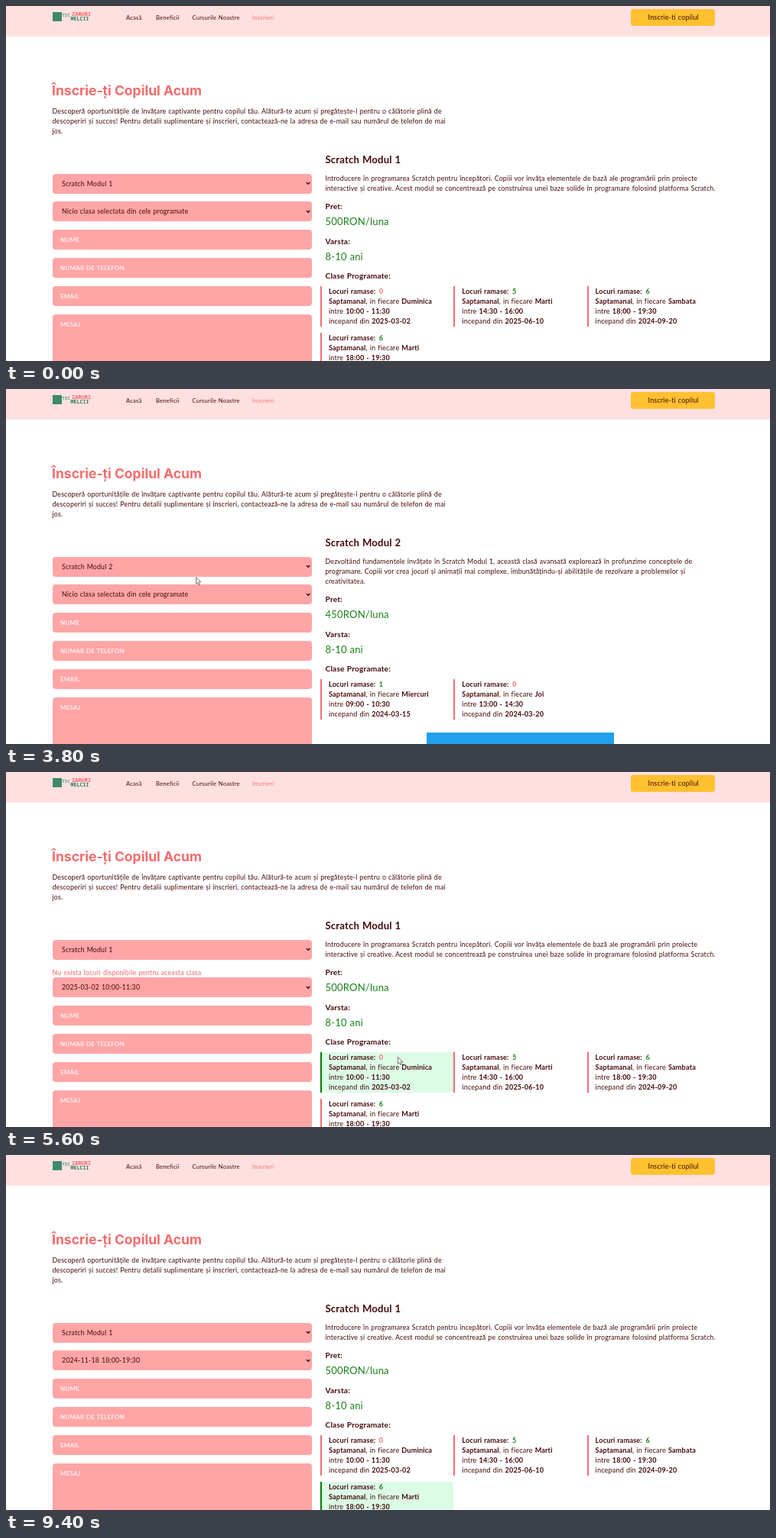
Animation of 999x465 px, one loop 9.5 s. Source, as an HTML page:

```html
<!DOCTYPE html>
<html lang="ro">
<head>
<meta charset="utf-8">
<title>Inscrieri</title>
<style>
  html, body { margin: 0; width: 100%; height: 100%; overflow: hidden; background: #fff; }
  #stage {
    position: absolute; left: 0; top: 0; width: 999px; height: 465px; overflow: hidden;
    color: #450a0a; font: 9px Lato, "Open Sans", sans-serif;
    letter-spacing: .018em; word-spacing: .055em;
  }
  #stage div, #stage svg { position: absolute; }
  .t { white-space: nowrap; line-height: 20px; }
  .t b { font-weight: 700; }
  #panel, #form { left: 0; top: 0; width: 999px; height: 465px; }
  .field { left: 60.5px; width: 339.5px; height: 26px; border-radius: 4px; background: #ffa5a5; }
  .focus { box-shadow: 0 0 0 1.3px #140505 inset, 0 0 0 .4px #140505; }
  .card { width: 172.4px; height: 53px; border-left: 2px solid #f56e6e; }
  .card.on { background: #dcfce7; border-color: #008000; }
  .mono { font-family: "Noto Sans Mono", "DejaVu Sans Mono", monospace; font-weight: 700; letter-spacing: 0; }
  .title { font-family: Inter, sans-serif; font-weight: 700; letter-spacing: 0; word-spacing: 0; }
</style>
</head>
<body>
<div id="stage"></div>
<script>
const LOOP = 9500, STEP = 100;
const RED = '#f56e6e', GREEN = '#1a821a', BODY = 8.83;
const stage = document.getElementById('stage');

function add(parent, cls, css, html = '') {
  const el = document.createElement('div');
  el.className = cls;
  el.style.cssText = css;
  el.innerHTML = html;
  parent.append(el);
  return el;
}
const box = (parent, x, y, w, h, css) =>
  add(parent, '', `left:${x}px;top:${y}px;width:${w}px;height:${h}px;${css}`);
// Text placed by its left edge and vertical centre.
const text = (parent, x, y, size, html, css = '', cls = '') =>
  add(parent, 't ' + cls, `left:${x}px;top:${y - 10}px;font-size:${size}px;${css}`, html);

// Header
box(stage, 0, 0, 999, 40, 'background:#ffe0e0');
box(stage, 61, 8, 12, 12, 'background:#3f8a6c');
text(stage, 73.5, 11.5, 5.6, 'TIC', 'color:#3f9a78', 'mono');
text(stage, 86, 11.2, 7, 'ZARURI', 'color:#ee6468', 'mono');
text(stage, 84.5, 17.3, 6.7, 'MELCII', 'color:#2f7d62', 'mono');
[[157, 'Acasă'], [196, 'Beneficii'], [243.5, 'Cursurile Noastre'], [322, 'Inscrieri', RED]]
  .forEach(([x, label, color = '#450a0a']) => text(stage, x, 15, 7.7, label, `color:${color}`));
box(stage, 817.4, 3.8, 109.9, 22.2, 'background:#ffc12f;border-radius:3px');
text(stage, 839.5, 14.8, 9.05, 'Inscrie-ti copilul');

// Intro
text(stage, 60, 110.5, 17.55, 'Înscrie-ți Copilul Acum', 'color:#f26c6c', 'title');
['Descoperă oportunitățile de învățare captivante pentru copilul tău. Alătură-te acum și pregătește-l pentru o călătorie plină de',
 'descoperiri și succes! Pentru detalii suplimentare și înscrieri, contactează-ne la adresa de e-mail sau numărul de telefon de mai',
 'jos.'].forEach((line, i) => text(stage, 60.5, 138 + i * 13, BODY, line));

// Course panel
const modules = [
  {
    name: 'Scratch Modul 1', price: '500RON/luna',
    about: [
      'Introducere în programarea Scratch pentru începători. Copiii vor învăța elementele de bază ale programării prin proiecte',
      'interactive și creative. Acest modul se concentrează pe construirea unei baze solide în programare folosind platforma Scratch.'],
    classes: [
      [0, 'Duminica', '10:00 - 11:30', '2025-03-02'],
      [5, 'Marti', '14:30 - 16:00', '2025-06-10'],
      [6, 'Sambata', '18:00 - 19:30', '2024-09-20'],
      [6, 'Marti', '18:00 - 19:30', '2024-11-18']]
  },
  {
    name: 'Scratch Modul 2', price: '450RON/luna',
    about: [
      'Dezvoltând fundamentele învățate în Scratch Modul 1, această clasă avansată explorează în profunzime conceptele de',
      'programare. Copiii vor crea jocuri și animații mai complexe, îmbunătățindu-și abilitățile de rezolvare a problemelor și',
      'creativitatea.'],
    classes: [
      [1, 'Miercuri', '09:00 - 10:30', '2024-03-15'],
      [0, 'Joi', '13:00 - 14:30', '2024-03-20']]
  }
];
const panel = add(stage, '', '');
panel.id = 'panel';

function addCard(parent, [seats, day, hours, date], i, top) {
  const x = 411 + (i % 3) * 174.3, y = top + Math.floor(i / 3) * 61.3;
  const card = add(parent, 'card', `left:${x}px;top:${y}px`);
  [`<b>Locuri ramase:</b><b style="margin-left:4.5px;color:${seats ? GREEN : RED}">${seats}</b>`,
   `<b>Saptamanal</b>, in fiecare <b>${day}</b>`,
   `intre <b>${hours}</b>`,
   `incepand din <b>${date}</b>`].forEach((row, k) => text(card, 9, 7 + k * 13.05, 9.1, row));
  return card;
}

const views = modules.map(m => {
  const el = add(panel, '', 'left:0;top:0');
  const x = 417.5, dy = (m.about.length - 2) * 13;
  text(el, x, 201, 13.15, m.name, 'font-weight:700');
  m.about.forEach((line, i) => text(el, x, 225.5 + i * 13, BODY, line));
  [[261.5, 'Pret:'], [307.5, 'Varsta:'], [353, 'Clase Programate:']]
    .forEach(([y, label]) => text(el, x, y + dy, 10.2, label, 'font-weight:700'));
  text(el, x, 282 + dy, 13.1, m.price, `color:${GREEN}`);
  text(el, x, 328 + dy, 13, '8-10 ani', `color:${GREEN}`);
  const cards = m.classes.map((c, i) => addCard(el, c, i, 367 + dy));
  return { el, cards };
});
box(views[1].el, 550, 450, 245, 20, 'background:#21a0eb');

// Form
function addSelect(parent, y) {
  const field = add(parent, 'field', `top:${y}px`);
  const label = text(field, 12.5, 13, 8.8, '');
  add(field, '', 'left:331px;top:10.5px;width:7px;height:5px',
    '<svg width="7" height="5" style="left:0;top:0"><path d="M1 1L3.2 3.4 5.4 1" fill="none" stroke="#1c0505" stroke-width="1.3"/></svg>');
  return { field, label };
}
const course = addSelect(stage, 219.7);
const error = text(stage, 60.5, 263, 8.8, 'Nu exista locuri disponibile pentru aceasta clasa', 'color:#ee6666');
const form = add(stage, '', '');
form.id = 'form';
const slot = addSelect(form, 256.4);
['NUME', 'NUMAR DE TELEFON', 'EMAIL', 'MESAJ'].forEach((label, i) => {
  const field = add(form, 'field', `top:${293.3 + i * 37}px;` + (i === 3 ? 'height:90px' : ''));
  text(field, 10.5, 13, 8.1, label, 'color:#fff;font-weight:500');
});

// Pointer
const pointer = add(stage, '', 'left:0;top:0;width:9px;height:12px',
  '<svg width="9" height="12" style="left:0;top:0"><path d="M.6.6V9.2L2.6 7.4 4 10.7 5.5 10 4.1 6.9H6.9Z" fill="#fff" stroke="#555" stroke-width=".8"/></svg>');

// Pointer runs of [time, x, y]; it is hidden between runs.
const runs = [
  [[400, 413, 198], [800, 350, 228], [1300, 295, 244], [1500, 295, 244], [1700, 287, 238],
   [2200, 287, 238], [2600, 258, 239], [2900, 252, 238.5], [3200, 250, 242], [3700, 248, 246],
   [4200, 248, 246], [4300, 250, 239], [4500, 250, 239], [4600, 262, 246], [4900, 414, 300.5],
   [5500, 512, 373], [5900, 512, 373], [6300, 568, 381]],
  [[6900, 352, 294], [7200, 248, 262], [7400, 248, 262], [7600, 241, 284], [8200, 241, 284],
   [8500, 515, 454], [8600, 515, 454], [8900, 515, 466]]
];

function pointerAt(t) {
  const run = runs.find(r => t >= r[0][0] && t <= r[r.length - 1][0]);
  if (!run) return null;
  const i = Math.max(1, run.findIndex(k => k[0] >= t));
  const [t0, x0, y0] = run[i - 1], [t1, x1, y1] = run[i];
  const u = (t - t0) / (t1 - t0);
  return [x0 + (x1 - x0) * u, y0 + (y1 - y0) * u];
}

const within = (t, a, b) => t >= a && t < b;
const show = (el, on) => { el.style.visibility = on ? 'visible' : 'hidden'; };
// Ease-out entrance lasting one second.
const enter = (t, start) => 1 - Math.pow(1 - Math.min(1, Math.max(0, (t - start) / 1000)), 1.65);

function render(t) {
  const mod = within(t, 2300, 4300) ? 1 : 0;
  const p = t < 2300 ? 1 : enter(t, mod ? 2558 : 4484);
  const pick = t < 5600 ? -1 : t < 6600 ? 0 : t < 8300 ? 1 : 3;

  views.forEach((v, i) => { v.el.style.display = i === mod ? 'block' : 'none'; });
  panel.style.opacity = p;
  panel.style.transform = p < 1 ? `translateX(${25 * (1 - p)}px)` : 'none';
  views[0].cards.forEach((c, i) => c.classList.toggle('on', i === pick));

  course.label.textContent = modules[mod].name;
  course.field.classList.toggle('focus', within(t, 2300, 3700) || within(t, 4300, 5500));
  slot.field.classList.toggle('focus', within(t, 8300, 9400));
  if (pick < 0) {
    slot.label.textContent = 'Nicio clasa selectata din cele programate';
  } else {
    const [, , hours, date] = modules[0].classes[pick];
    slot.label.textContent = `${date} ${hours.replace(/ /g, '')}`;
  }
  show(error, pick === 0);
  form.style.top = pick === 0 ? '13px' : '0';

  const pos = pointerAt(t);
  show(pointer, pos);
  if (pos) pointer.style.transform = `translate(${pos[0]}px,${pos[1]}px)`;
}

const begin = performance.now();
function tick() {
  const t = (performance.now() - begin) % LOOP;
  render(Math.floor(t / STEP) * STEP);
  requestAnimationFrame(tick);
}
tick();
</script>
</body>
</html>
```
